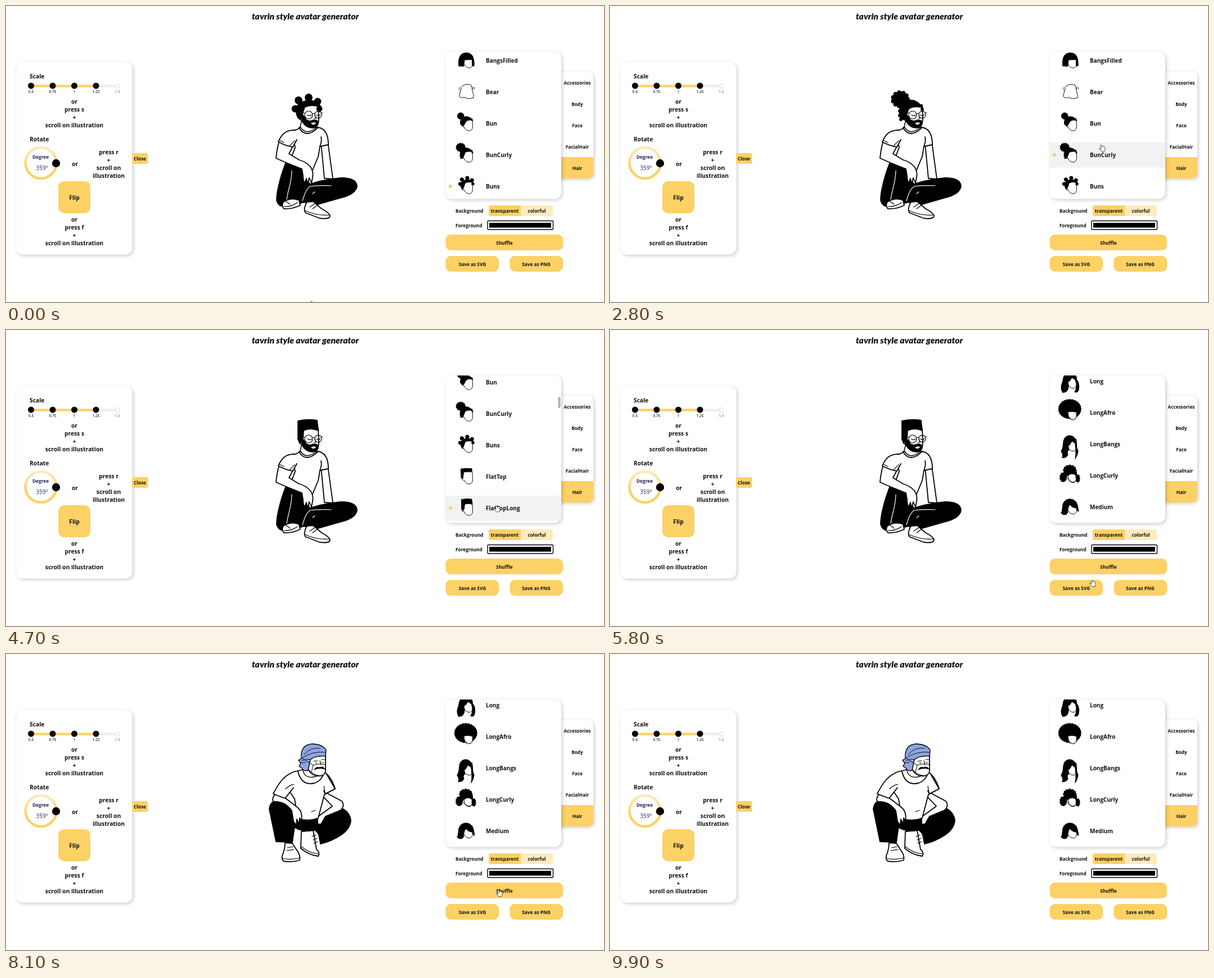
An HTML page for the animation above (10000 ms loop, 1063x527 px).

```html
<!DOCTYPE html>
<html lang="en">
<head>
<meta charset="utf-8">
<title>avatar generator</title>
<style>
  html, body { margin: 0; width: 100%; height: 100%; overflow: hidden; background: #fff; }
  svg { display: block; width: 100vw; height: 100vh; }
  text { font: 700 8.3px 'Open Sans', 'Noto Sans', sans-serif; text-anchor: middle; fill: #111; }
  .big text, text.big { font-size: 10.3px; }
  .start, .start text { text-anchor: start; }
  #title { font: italic 900 15.6px Lato, 'Open Sans', sans-serif; }
  .ticks text { font-size: 6.6px; font-weight: 600; fill: #333; }
  .panel { fill: #fff; filter: drop-shadow(2px 2px 3px rgba(0,0,0,.2)); }
  .gold { fill: #fcd166; }
  .ink { fill: #fff; stroke: #000; stroke-width: 1.8; stroke-linejoin: round; stroke-linecap: round; }
  .k { fill: #000; }
  .n { fill: none; }
  .thin { fill: none; stroke-width: 1.2; }
  .crease { fill: none; stroke: #fff; stroke-width: 1.2; }
  .blue { fill: #8fa5e0; stroke-width: 1.4; }
</style>
</head>
<body>
<svg viewBox="0 0 1063 527" preserveAspectRatio="none">
  <defs>
    <clipPath id="listClip"><rect x="781.5" y="81" width="205.5" height="262.5" rx="12"/></clipPath>
    <linearGradient id="ringFade" x1="0" y1="0" x2="0" y2="1">
      <stop offset="0" stop-color="#fdebb9"/><stop offset=".65" stop-color="#fcd166"/>
    </linearGradient>
  </defs>

  <text id="title" x="532" y="24">tavrin style avatar generator</text>

  <!-- Left panel -->
  <rect class="panel" x="18.5" y="100" width="206" height="342.5" rx="12"/>
  <g class="big">
    <g class="start"><text x="42" y="129">Scale</text><text x="42" y="241">Rotate</text></g>
    <text x="121.5" y="173.5">or</text><text x="121.5" y="187.5">press s</text>
    <text x="121.5" y="202">+</text><text x="121.5" y="215.5">scroll on illustration</text>
    <text x="122.5" y="285">or</text><text x="182.5" y="264">press r</text>
    <text x="182.5" y="278">+</text><text x="182.5" y="291.5">scroll on</text><text x="182.5" y="305.5">illustration</text>
    <text x="121.5" y="383.5">or</text><text x="121.5" y="397.5">press f</text>
    <text x="121.5" y="412">+</text><text x="121.5" y="425.5">scroll on illustration</text>
  </g>
  <path d="M160 142.5H198" stroke="#eee" stroke-width="4.5"/>
  <path d="M44 142.5H160" stroke="#fcd166" stroke-width="4.5"/>
  <circle cx="44.5" cy="142" r="5.5"/><circle cx="83" cy="142" r="5.5"/>
  <circle cx="121.5" cy="142" r="5.5"/><circle cx="160" cy="142" r="5.5"/>
  <circle cx="198" cy="142.5" r="3.8" fill="#fff" stroke="#e2e2e2" stroke-width="1.3"/>
  <g class="ticks">
    <text x="44.5" y="155">0.5</text><text x="83" y="155">0.75</text><text x="121.5" y="155">1</text>
    <text x="160" y="155">1.25</text><text x="198" y="155" style="fill:#888">1.5</text>
  </g>
  <circle cx="62" cy="279.5" r="27.5" fill="none" stroke="url(#ringFade)" stroke-width="4.6"/>
  <circle cx="89" cy="280" r="7.2"/>
  <text x="61.5" y="272" style="fill:#25275f">Degree</text>
  <text x="64" y="292" style="fill:#25275f;font-size:10px;font-weight:400">359°</text>
  <rect class="gold" x="93" y="312" width="57" height="57" rx="10"/><text class="big" x="121.5" y="344.5">Flip</text>
  <rect class="gold" x="224" y="262" width="28.5" height="19" rx="3"/><text x="238" y="275">Close</text>

  <!-- Right panel -->
  <rect class="panel" x="975" y="117" width="69" height="190" rx="10"/>
  <path class="gold" d="M987 269H1044V297Q1044 307 1034 307H987Z"/>
  <text x="1015.5" y="139.5">Accessories</text><text x="1015.5" y="178">Body</text><text x="1015.5" y="216">Face</text>
  <text x="1015.5" y="254">FacialHair</text><text x="1015.5" y="292">Hair</text>
  <rect class="panel" x="781.5" y="81" width="205.5" height="262.5" rx="12"/>
  <g clip-path="url(#listClip)">
    <g id="list">
      <rect id="hover" x="781" width="206" height="44.5" fill="#f1f2f4"/>
      <circle id="dot" class="gold" cx="790" r="3.1"/>
      <g id="rows"></g>
    </g>
    <rect id="thumb" x="981.3" width="4.4" height="20" rx="2.2" fill="#b3b3b3"/>
  </g>
  <g class="start" style="font-weight:600"><text x="799" y="368">Background</text><text x="799" y="394">Foreground</text></g>
  <rect x="890" y="355" width="82" height="19" rx="3" fill="#fdebbd"/>
  <path class="gold" d="M861 355H915V374H861Q858 374 858 371V358Q858 355 861 355Z"/>
  <text x="886.5" y="368">transparent</text><text x="943.5" y="368">colorful</text>
  <rect x="856" y="382.5" width="116.5" height="15.5" rx="1.5" fill="#fff" stroke="#000" stroke-width="1.4"/>
  <rect x="859" y="386" width="110" height="8.6"/>
  <rect class="gold" x="781.5" y="407" width="208.5" height="28" rx="9"/><text x="886" y="424.5">Shuffle</text>
  <rect class="gold" x="781.5" y="445" width="94.5" height="28" rx="9"/><text x="829" y="462.5">Save as SVG</text>
  <rect class="gold" x="895.5" y="445" width="94.5" height="28" rx="9"/><text x="942.5" y="462.5">Save as PNG</text>

  <!-- Bodies -->
  <g id="sit" class="ink">
    <path d="M560 244L566 307 581 308 571 234Z"/>
    <path d="M522 216Q519 221 508 222L514 252 504 278 545 292 555 268 558 250 573 247C573 232 569 218 554 216Z"/>
    <path d="M527 198L523 215Q533 232 552 216L551 206" style="stroke-width:1.5"/>
    <path class="n" d="M521 217Q533 237 554 217"/>
    <path class="n" d="M558 250Q562 240 560 233"/>
    <path class="k" d="M499 275C490 296 481 328 481 346Q484 357 494 357L528 350 540 318 528 288Z"/>
    <path class="k" d="M526 322Q560 309 596 306Q622 306 624 320Q623 335 594 342L552 354 528 349 516 345Z"/>
    <path class="crease" d="M508 293C508 315 500 330 499 346M527 347Q533 325 541 321Q560 319 578 320M545 334L549 331"/>
    <path d="M493 349Q507 340 521 346L523 355Q508 362 494 361Q489 356 493 349Z"/>
    <path class="thin" d="M494 357Q507 358 518 350M498 348L505 353"/>
    <path d="M535 349Q528 361 532 368L558 378Q575 380 576 374Q575 368 561 361L546 348Z"/>
    <path class="thin" d="M531 364Q553 374 575 372M540 358L549 352M545 361L553 355"/>
    <path d="M488 236C482 248 481 261 480 271Q502 281 526 290L528 302Q528 311 531 315L534 307 536 317 539 306 543 315 545 305Q547 295 541 286Q533 277 521 274L503 263 510 250Z"/>
    <path d="M512 221C497 221 490 228 484 242Q497 249 510 251L517 238"/>
    <path class="thin" d="M505 248L513 240M486 239L494 243"/>
  </g>
  <g id="stand" class="ink" style="stroke-width:1.6">
    <path d="M506 198C496 215 491 228 493 237Q501 257 518 268L528 262 511 241 518 220Z"/>
    <path d="M562 196Q573 204 580 238Q584 255 578 262L577 283Q573 290 571 282L571 262 562 225Z"/>
    <path d="M528 182L527 191Q531 220 544 248L558 245 550 190 547 181Z"/>
    <path class="n" d="M527 191Q539 201 550 190"/>
    <path class="k" d="M544 246H558V268L563 368 542 366 540 330 530 373 510 366 521 302 523 266H545Z"/>
    <path class="crease" d="M539 337L541 366"/>
    <path d="M525 191L522 204 529 215 545 245 544 271Q526 274 511 270L516 232Q506 212 507 199Q514 192 525 191Z"/>
    <path d="M550 190Q562 192 566 200L572 225 576 260Q566 264 558 262L557 240Q557 215 550 190Z"/>
    <path class="thin" d="M526 192L528 203 524 206M552 193L559 205 556 212M521 241H534V246H521ZM561 241H569V246H561Z"/>
    <path d="M516 262Q525 253 535 256L542 264Q538 271 523 269Z"/>
    <path class="thin" d="M530 259L540 264M527 263L538 268"/>
    <path d="M508 372L502 384Q499 390 502 392H511Q519 383 523 376Z"/>
    <path d="M541 373L548 386Q558 389 570 388Q571 383 560 378L557 373Z"/>
    <path class="thin" d="M502 389H512M548 383Q557 387 569 385"/>
  </g>
  <g id="squat" class="ink">
    <path d="M525 316L524 346Q538 358 555 360Q559 353 552 348L546 314Z"/>
    <path class="thin" d="M525 343Q540 355 556 356M544 325L551 322M546 331L553 328M547 337L554 334"/>
    <path class="k" d="M508 289Q530 296 552 294L566 283 600 276Q612 284 613 297Q611 312 596 322 578 334 559 338L556 322Q551 312 545 314 525 317 512 308Z"/>
    <path d="M571 248L597 262Q603 270 595 278L568 289 560 303 554 303 554 290 580 271 562 252Z"/>
    <path d="M526 206L512 210Q498 219 497 234L513 258 519 294Q540 298 555 292L566 250 585 240Q578 217 564 209L552 207Z"/>
    <path d="M527 204Q530 224 551 218L563 211" style="stroke-width:1.4"/>
    <path class="n" d="M519 209Q525 235 548 230Q563 225 565 209"/>
    <path class="n" d="M570 214L585 240 570 248Q566 249 565 243"/>
    <path class="thin" d="M565 235L567 247M543 281L550 278"/>
    <path class="k" d="M468 276Q470 261 483 261Q501 265 508 279L514 300 509 335 480 334Z"/>
    <path d="M480 248C472 256 473 263 478 263Q497 263 508 279L511 298 516 305 517 294 521 303 522 292 525 297Q528 281 518 273L496 256Z"/>
    <path d="M514 209C495 215 485 229 475 249L496 257 511 238"/>
    <path class="thin" d="M497 240Q505 233 512 232"/>
    <path d="M496 336Q496 348 491 359Q490 367 494 369Q511 371 522 367Q524 360 518 351L509 337Z"/>
    <path class="thin" d="M491 364Q507 367 522 363M500 345L510 343M499 350L512 348"/>
    <path d="M540 184L536 202Q541 216 554 217Q567 218 568 208L568 180Z"/>
    <path class="blue" d="M537 207Q530 210 526 203L521 200 524 194 520 189 525 186Q523 161 545 160Q563 161 569 171L568 182Q551 180 541 188Z"/>
    <path class="thin" style="stroke-width:.9" d="M525 186Q545 172 568 175M530 179Q542 165 559 168M526 190Q535 186 541 188M524 194L532 193"/>
    <path class="thin" style="stroke-width:1" d="M527 186L546 198Q557 194 568 197M537 206L544 211M546 198L543 210Q549 217 564 217"/>
    <path class="thin" d="M547 191L554 190M561 188L567 188M550 194H553M562 193H565M558 190L560 197"/>
    <path class="k" stroke-width=".8" d="M548 206Q551 200 557 202Q564 199 567 205Q557 202 548 206Z"/>
  </g>

  <!-- Head shared by the sitting and standing poses -->
  <g id="head" class="ink">
    <path id="skull" d="M524 176L524 196Q520 194 521 200Q523 204 528 203Q532 216 546 216Q556 214 556 200L555 176Z"/>
    <g id="beard">
      <path class="k" d="M524 194L527 206Q533 217 545 217Q555 216 555 207Q553 203 547 203L540 205 534 203 527 193Z"/>
      <path d="M542 209Q546 206 551 208Q549 212 545 211Z" stroke="none"/>
      <path class="thin" d="M524 189L531 191M544 192L549 191M561 190H563M536 194Q540 197 543 194M552 194Q556 197 559 193M549 194L551 200H547"/>
      <circle class="thin" cx="538" cy="194" r="7"/><circle class="thin" cx="555" cy="193.5" r="6.2"/>
    </g>
    <g id="tache">
      <path class="k" d="M535 204Q541 196 546 200Q552 195 557 203L561 203Q555 208 547 203Q540 209 535 204Z"/>
      <path class="n" d="M535 188L544 190M551 190L557 186"/>
      <path class="thin" d="M526 191L533 193M544 193H549M549 194L551 199M544 211H552"/>
      <circle class="thin" cx="539" cy="194" r="5.5"/><circle class="thin" cx="554" cy="193.5" r="5"/>
      <circle class="k" cx="540" cy="194" r=".8"/><circle class="k" cx="554" cy="194" r=".8"/>
    </g>
    <g id="hair"></g>
  </g>

  <path id="hand" class="ink" style="stroke:#333;stroke-width:.9"
    d="M1 1Q2.6-.5 3.4 1.2L4.2 4.2Q6-.2 8.6 4.8Q10 8.5 8.4 11.5L3.4 12Q0 8.6-1.8 7Q-1.6 5.2 1.6 7Z"/>
</svg>

<script>
const $ = id => document.getElementById(id);
const path = (d, cls = 'k') => `<path class="${cls}" d="${d}"/>`;
const ball = (x, y, r) => `<circle class="k" cx="${x}" cy="${y}" r="${r}"/>`;

// Curly mass: a solid ellipse ringed with small curls
function curls(x, y, rx, ry, n, r) {
  let out = `<ellipse class="k" cx="${x}" cy="${y}" rx="${rx}" ry="${ry}"/>`;
  for (let i = 0; i < n; i++) {
    const a = i / n * 2 * Math.PI;
    out += ball((x + rx * Math.cos(a)).toFixed(1), (y + ry * Math.sin(a)).toFixed(1), r);
  }
  return out;
}

const crown = path('M519 199Q512 184 520 175Q538 162 556 174L560 180Q543 174 531 180L527 192 523 202Z');
const hair = {
  BangsFilled: path('M509 209Q506 165 535 165Q563 165 561 209L555 210 554 188 529 189 526 210Z'),
  Bear: path('M518 174Q534 159 552 169L557 194Q562 203 558 211M516 183L511 206Q518 214 527 209Q543 216 558 211', 'n') +
    '<circle class="thin" cx="514" cy="180" r="4"/><circle class="thin" cx="559" cy="178" r="3.5"/>',
  Bun: ball(516, 166, 11) + path('M515 193Q511 172 533 168Q549 167 557 183Q543 175 533 186L526 199 522 200Z'),
  BunCurly: curls(516, 166, 13, 12, 11, 3) + path('M516 199Q511 177 525 170Q542 162 556 181Q541 177 531 183L527 194 523 203Z') +
    [[515, 187], [515, 195], [517, 202], [555, 184]].map(c => ball(...c, 2)).join(''),
  Buns: crown + [[514, 183, 5.5], [520, 168, 6], [538, 163, 6], [554, 170, 5.5], [557, 183, 4.5]].map(c => ball(...c)).join(''),
  FlatTop: path('M517 165Q535 162 553 164L554 173Q538 172 526 176L524 192 522 198 518 196Z'),
  FlatTopLong: path('M519 162Q537 158 553 161L555 179Q541 173 529 179L528 193 523 201 519 195Z'),
  HatHip: path('M518 182Q514 160 537 161Q556 162 556 182L564 184 514 186Z'),
  Long: path('M509 230Q499 215 509 194Q511 164 534 161Q553 163 556 186Q567 200 563 220Q560 234 549 228Q556 218 555 202L552 188 540 180Q535 192 527 195L529 210Q527 232 509 230Z'),
  LongAfro: curls(533, 180, 33, 28, 24, 5) + path('M527 190Q540 186 556 191L555 206Q553 216 543 216 533 214 529 204Z', ''),
  LongBangs: path('M508 238Q512 227 504 217Q511 203 511 190Q512 164 533 163Q553 165 556 190Q555 205 561 215Q560 229 551 242Q554 227 553 212L551 190 540 182Q535 195 528 199L530 212Q522 218 527 228 521 240 508 238Z'),
  LongCurly: curls(533, 174, 18, 14, 12, 4) + curls(511, 198, 8, 12, 9, 4) + curls(560, 202, 4, 10, 9, 3) +
    path('M516 180H556V192H516Z') + path('M528 192Q539 181 553 191L554 206Q550 215 541 214 532 211 529 204Z', ''),
  Medium: path('M508 199Q507 168 532 165Q557 165 561 196L562 208Q556 205 555 196 541 195 533 184 528 191 526 204 528 214 519 218 508 219 504 212 508 207 508 199Z')
};

const pitch = 56, firstRow = 109, startIndex = 5;
const names = Object.keys(hair);
const rowY = name => firstRow + (names.indexOf(name) + startIndex) * pitch;
const skull = $('skull').getAttribute('d');

$('rows').innerHTML = names.map(name => {
  const y = rowY(name);
  return `<g class="ink" transform="translate(534.8 ${y - 101.7}) scale(.53)">` +
    (name == 'Bear' ? '' : path(skull, '')) + hair[name] +
    `</g><text class="big start" style="font-size:10px" x="853" y="${y + 3.5}">${name}</text>`;
}).join('');

// [time, x, y] of the pointer tip
const pointer = [
  [0, 541, 525], [200, 864, 145], [300, 864, 145], [600, 861, 158], [900, 861, 158], [1000, 872, 171],
  [1300, 872, 171], [1600, 872, 214], [2300, 872, 214], [2500, 871, 247], [3900, 871, 247],
  [4200, 869, 312], [5300, 869, 312], [5800, 854, 445], [6100, 873, 419], [6700, 873, 419],
  [7000, 873, 302], [7400, 873, 302], [7800, 873, 420], [8700, 873, 420], [9100, 650, 483],
  [9300, 650, 483], [9700, 541, 530]
];
const scroll = [[0, 291.5], [3000, 291.5], [3600, 407.5], [4700, 407.5], [5500, 746]];
const picks = [[0, 'Buns'], [1300, 'Bear'], [2100, 'Bun'], [2800, 'BunCurly'], [3800, 'FlatTop'], [4400, 'FlatTopLong'], [7300, 'Medium'], [8000, '']];
const poses = [[0, 'sit'], [6300, 'stand'], [8000, 'squat']];

const linear = u => u, smooth = u => u * u * (3 - 2 * u);
const current = (keys, t) => keys.filter(k => k[0] <= t).pop()[1];

function between(keys, t, ease) {
  const i = keys.findIndex(k => k[0] > t);
  if (i < 0) return keys[keys.length - 1].slice(1);
  const a = keys[i - 1], b = keys[i], u = ease((t - a[0]) / (b[0] - a[0]));
  return a.slice(1).map((v, j) => v + (b[j + 1] - v) * u);
}

const show = (id, on) => { $(id).style.display = on ? '' : 'none'; };

function draw(t) {
  const [x, y] = between(pointer, t, linear);
  const [offset] = between(scroll, t, smooth);
  const pick = current(picks, t), pose = current(poses, t);

  $('list').setAttribute('transform', `translate(0 ${-offset})`);
  $('hand').setAttribute('transform', `translate(${x} ${y})`);
  show('hand', t < 9700);

  const over = x > 782 && x < 987 && y > 81 && y < 343 &&
    names.find(n => Math.abs(rowY(n) - offset - y) < 22);
  show('hover', over);
  if (over) $('hover').setAttribute('y', rowY(over) - 22.5);
  show('dot', pick);
  if (pick) $('dot').setAttribute('cy', rowY(pick) - .5);

  show('thumb', t >= 3100 && t < 3700 || t >= 4700 && t < 5800);
  $('thumb').setAttribute('y', 81 + offset * 242 / 2592);

  for (const [, id] of poses) show(id, id == pose);
  show('head', pose != 'squat');
  show('beard', pose == 'sit');
  show('tache', pose == 'stand');
  $('head').setAttribute('transform', pose == 'stand' ? 'translate(107.6 16.5) scale(.8)' : '');
  $('hair').innerHTML = hair[pick] || '';
}

let last = -1;
function tick() {
  const t = Math.floor(performance.now() % 10000 / 100) * 100;
  if (t != last) draw(last = t);
  requestAnimationFrame(tick);
}
tick();
</script>
</body>
</html>
```
